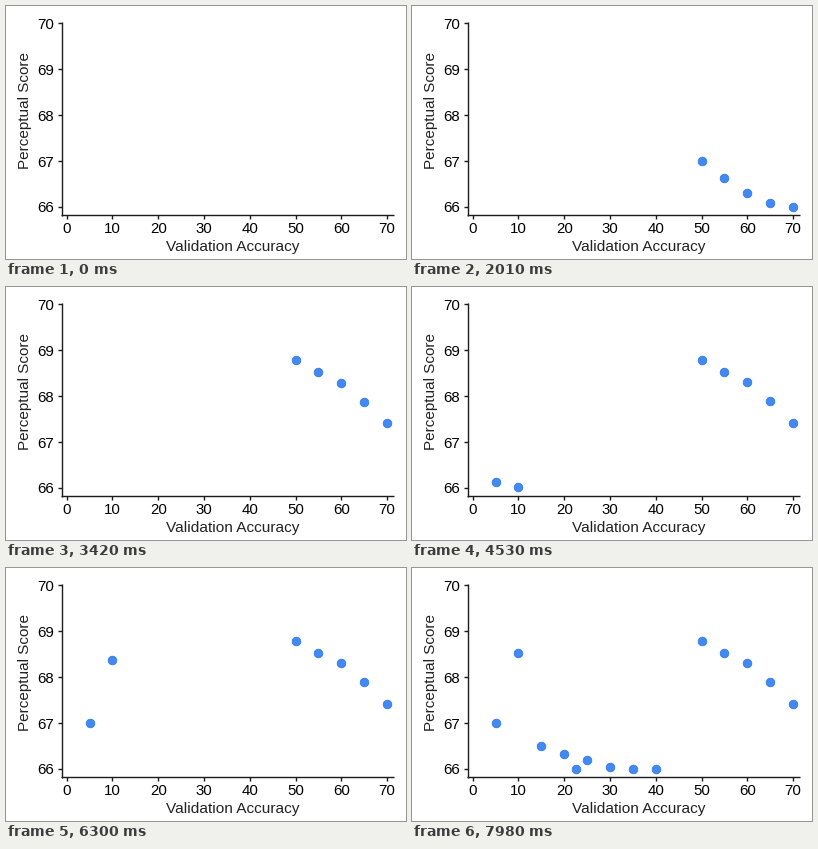
A matplotlib script that plays this animation: 400 px wide and 253 px high, repeating every 8 s.

```python
import numpy as np
import matplotlib.pyplot as plt
from matplotlib.animation import FuncAnimation

W, H, DPI = 400, 253, 100
PX = 72 / DPI                # points per pixel
LOOP, INTERVAL, STEP = 8000, 20, 30

SLIDE_SPEED = 1 / 6          # accuracy units per ms
RISE_DELAY = 626             # ms from launch to rise
RISE_SPEED = 0.00163         # score units per ms
RISE_EASE = 640              # ms of speeding up, and of slowing down

# launch time, accuracy, final score
DOTS = [
    (450, 50, 68.78), (675, 55, 68.52), (900, 60, 68.31),
    (1125, 65, 67.89), (1350, 70, 67.42),
    (3600, 5, 67.0), (3825, 10, 68.52),
    (6735, 15, 68.5), (6847, 20, 68.5), (6960, 25, 68.5),
    (7170, 30, 68.5), (7395, 35, 68.5), (7620, 40, 68.5), (7845, 45, 68.5),
]


def to_px(accuracy, score):
    return 60.7 + 4.577 * accuracy, 200.7 - 45.9 * (score - 66)


def ramp(t):
    """Integral of a clipped linear speed-up to full speed."""
    if t <= 0:
        return 0.0
    if t < RISE_EASE:
        return t * t / (2 * RISE_EASE)
    return t - RISE_EASE / 2


def rise(t, height):
    return RISE_SPEED * (ramp(t) - ramp(t - height / RISE_SPEED))


def dot_position(t, launch, accuracy, score):
    x = min(accuracy, SLIDE_SPEED * (t - launch))
    y = 66 + rise(t - launch - RISE_DELAY, score - 66)
    return to_px(x, y)


# the small margin keeps the pixel size from rounding down
fig = plt.figure(figsize=((W + 0.01) / DPI, (H + 0.01) / DPI), dpi=DPI,
                 facecolor="white")
ax = fig.add_axes([0, 0, 1, 1])
ax.set_xlim(0, W)
ax.set_ylim(H, 0)
ax.axis("off")


def line(xs, ys):
    ax.plot(xs, ys, color="#1c1c1c", lw=1.4 * PX, solid_capstyle="butt")


def label(x, y, text, size, color="black", **kwargs):
    ax.text(x, y, text, family="Liberation Sans", fontsize=size * PX,
            color=color, va="baseline", **kwargs)


line([55.5, 55.5], [16, 210])
line([55, 388], [209.5, 209.5])
for score in range(66, 71):
    y = to_px(0, score)[1] + 0.3
    line([51.5, 55.5], [y, y])
    label(47.8, y + 5.4, str(score), 15, ha="right")
for accuracy in range(0, 71, 10):
    x = to_px(accuracy, 66)[0]
    line([x, x], [209.5, 213])
    label(x, 227.4, str(accuracy), 15, ha="center")
label(226.8, 244.8, "Validation Accuracy", 15.4, "#222222", ha="center")
label(23.2, 104, "Perceptual Score", 15.2, "#222222", ha="center",
      rotation=90, rotation_mode="anchor")

dots, = ax.plot([], [], "o", ms=8.6 * PX, mfc="#4289f3", mec="#3179e2",
                mew=0.8 * PX, snap=False, zorder=5)


def update(frame):
    t = (frame * INTERVAL + INTERVAL // 2) // STEP * STEP
    points = [dot_position(t, *dot) for dot in DOTS if t >= dot[0]]
    dots.set_data(*np.array(points).reshape(-1, 2).T)
    return dots,


anim = FuncAnimation(fig, update, frames=LOOP // INTERVAL, interval=INTERVAL,
                     repeat=True, repeat_delay=0, blit=True)
plt.show()
```
